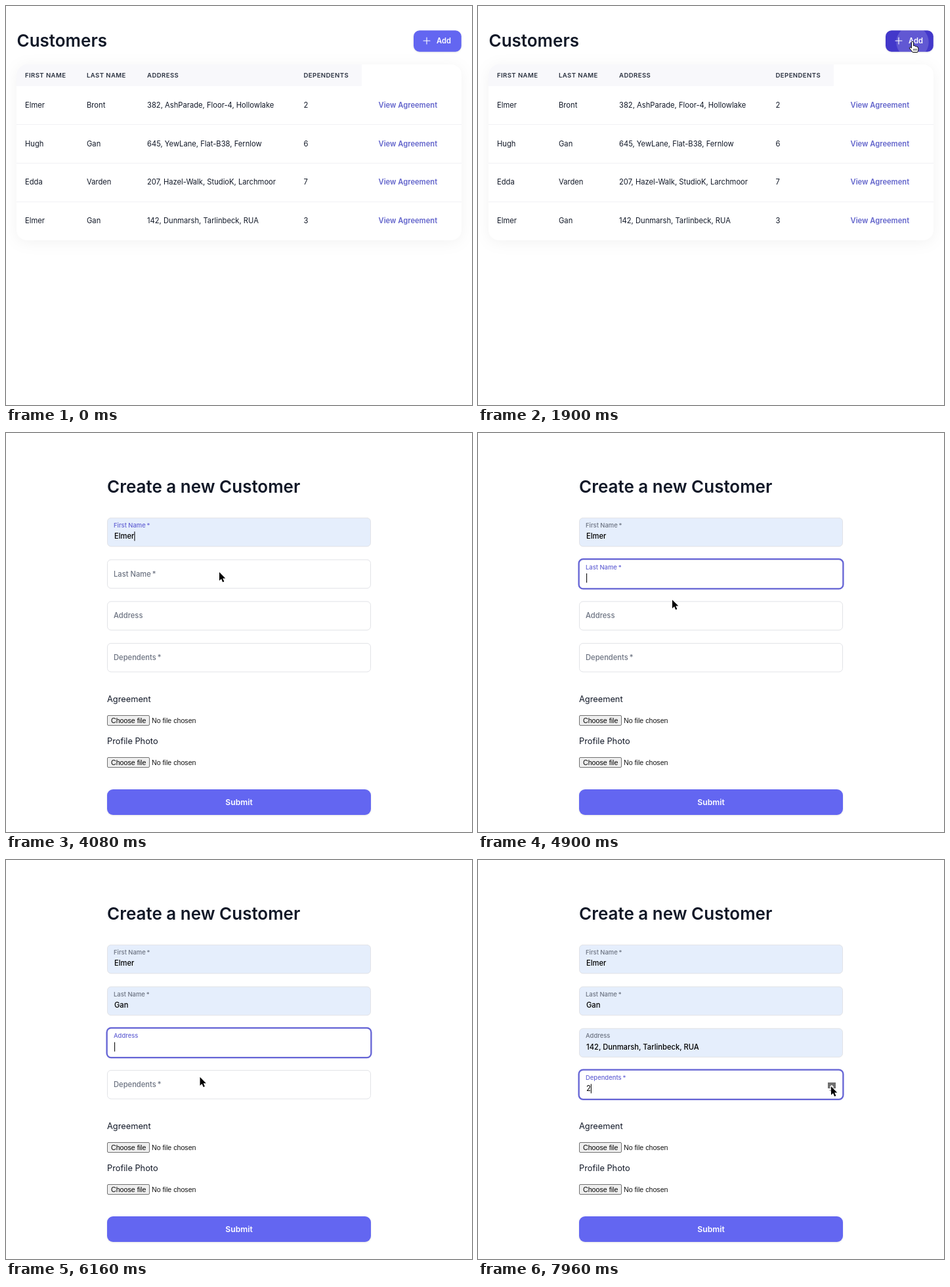
An HTML page that plays this animation: 710 by 608 pixels, repeating every 8 s.

```html
<!DOCTYPE html>
<html lang="en">
<head>
<meta charset="utf-8">
<title>Customers</title>
<style>
  html, body { margin: 0; width: 100%; height: 100%; overflow: hidden; background: #fff; }
  svg { display: block; width: 710px; height: 608px; font-family: Inter, sans-serif; }
  .card { filter: drop-shadow(0 3px 11px rgba(0, 0, 0, .05)); }
  .button { filter: drop-shadow(0 1px 1px rgba(0, 0, 0, .1)); }
  .file { font-family: "Liberation Sans", Arial, sans-serif; }
</style>
</head>
<body>
<svg id="stage" viewBox="0 0 710 608"></svg>
<script>
const LOOP = 8000;
const INK = '#111827', GRAY = [107, 114, 128], INDIGO = [99, 98, 212];
const BUTTON = [99, 102, 241], BUTTON_HOVER = [67, 56, 202];
const PAGE_SWITCH = 2060, HOVER_ADD = 1420, PRESS_ADD = 1850;

const stage = document.getElementById('stage');

function el(parent, tag, attrs = {}, content) {
  const node = document.createElementNS('http://www.w3.org/2000/svg', tag);
  set(node, attrs);
  if (content) node.textContent = content;
  parent.appendChild(node);
  return node;
}
function set(node, attrs) {
  for (const key in attrs) node.setAttribute(key, attrs[key]);
}
function show(node, on) {
  node.style.display = on ? '' : 'none';
}
function label(parent, x, y, content, size, weight = 400, fill = INK, more = {}) {
  return el(parent, 'text', { x, y, 'font-size': size, 'font-weight': weight, fill, ...more }, content);
}
function box(parent, x, y, width, height, rx, fill, more = {}) {
  return el(parent, 'rect', { x, y, width, height, rx, fill, ...more });
}
const clamp = v => Math.max(0, Math.min(1, v));
const smooth = v => v * v * (3 - 2 * v);
const easeOut = v => 1 - (1 - v) ** 3;
const mix = (a, b, k) => a + (b - a) * k;
const mixColor = (a, b, k) => `rgb(${a.map((c, i) => Math.round(mix(c, b[i], k)))})`;

// Customer list
const list = el(stage, 'g');
label(list, 16.5, 62, 'Customers', 26, 600);
const addBox = box(list, 621, 37.3, 72.8, 32.4, 9, '', { class: 'button' });
box(el(list, 'clipPath', { id: 'addClip' }), 621, 37.3, 72.8, 32.4, 9, '#000');
const ripple = el(el(list, 'g', { 'clip-path': 'url(#addClip)' }), 'circle', { cx: 662, cy: 55, fill: '#fff' });
el(list, 'path', { d: 'M641 48V58M636 53H646', stroke: '#fff', 'stroke-width': 1.1, 'stroke-linecap': 'round' });
label(list, 656, 57, 'Add', 11.2, 600, '#fff');

box(list, 16, 89, 678, 268, 16, '#fff', { class: 'card' });
el(list, 'path', { d: 'M16 122V105a16 16 0 0 1 16-16H542V122Z', fill: '#f8f8fb' });
const columns = [29, 123, 215, 453.5];
['FIRST NAME', 'LAST NAME', 'ADDRESS', 'DEPENDENTS'].forEach((name, i) =>
  label(list, columns[i], 109, name, 9.6, 600, '#2b3240', { 'letter-spacing': .4 }));
const HOME = '142, Dunmarsh, Tarlinbeck, RUA';
[
  ['Elmer', 'Bront', '382, AshParade, Floor-4, Hollowlake', '2'],
  ['Hugh', 'Gan', '645, YewLane, Flat-B38, Fernlow', '6'],
  ['Edda', 'Varden', '207, Hazel-Walk, StudioK, Larchmoor', '7'],
  ['Elmer', 'Gan', HOME, '3']
].forEach((row, r) => {
  const y = 155 + 58.7 * r;
  row.forEach((cell, i) => label(list, columns[i], y, cell, 11.2));
  label(list, 567.5, y, 'View Agreement', 11.2, 600, '#6264cb');
  if (r) box(list, 16, 121 + 59 * r, 678, 1, 0, '#f1f1f4');
});

// Customer form
const form = el(stage, 'g');
label(form, 154, 91, 'Create a new Customer', 26, 600);

const fields = [
  { name: 'First Name', star: true, focus: 2920, blur: 4720, fill: 3900, value: 'Elmer', hover: [2620, 2920] },
  { name: 'Last Name', star: true, focus: 4720, blur: 5745, fill: 5580, value: 'Gan', ring: [4780, 5830] },
  { name: 'Address', focus: 5745, blur: 7640, fill: 6720, value: HOME, ring: [5830, 7690] },
  { name: 'Dependents', star: true, focus: 7640, blur: LOOP, hover: [6740, 7640], ring: [7690, LOOP] }
];
const within = (t, span) => !!span && t >= span[0] && t < span[1];

fields.forEach((f, i) => {
  f.y = 128.9 + 63.7 * i;
  f.box = box(form, 154.5, f.y + .5, 401, 43.5, 5.5, '#fff', { stroke: '#e2e3e7' });
  f.outline = box(form, 153.6, f.y - .4, 402.8, 45.2, 6.5, 'none', { stroke: '#6665d6', 'stroke-width': 2.3 });
  f.title = label(form, 164, 0, f.name, 11.2, 500);
  if (f.star) el(f.title, 'tspan', { dx: 1.8 }, '*');
  f.text = label(form, 165, f.y + 32.2, '', 11.2, i < 3 ? 500 : 400, '#000');
  f.caret = box(form, 165, f.y + 21.3, 1.1, 14.2, 0, '#111');
});

const spinner = el(form, 'g');
const spinBox = box(spinner, 533, 339, 12, 9, 0, '#707070');
const spinUp = el(spinner, 'path', { d: 'M535.5 346.5L539 342.7L542.5 346.5Z' });
el(spinner, 'path', { d: 'M535.5 350.5L539 354.3L542.5 350.5Z', fill: '#3c3c3c' });

[['Agreement', 410], ['Profile Photo', 474]].forEach(([name, y]) => {
  label(form, 154, y, name, 12.8);
  box(form, 154.5, y + 20.5, 64, 15, 1.5, '#efefef', { stroke: '#707070' });
  label(form, 160, y + 32, 'Choose file', 10.67, 400, '#000', { class: 'file' });
  label(form, 222, y + 32, 'No file chosen', 10.67, 400, '#111', { class: 'file' });
});
box(form, 154, 543, 402, 39, 9, '#6366f1', { class: 'button' });
label(form, 355, 567, 'Submit', 12.2, 600, '#fff', { 'text-anchor': 'middle' });

// Pointers
const pointers = { arrow: el(stage, 'g'), hand: el(stage, 'g'), beam: el(stage, 'g') };
el(pointers.arrow, 'path', {
  d: 'M0 0V13L3 10.2L5.2 15.2L7.4 14.2L5.2 9.4H9.3Z',
  stroke: '#fff', 'stroke-width': 1.4, 'paint-order': 'stroke'
});
el(pointers.hand, 'path', {
  d: 'M-1.6 1.2Q-1.6-.3 0-.3T1.6 1.2V6.2L2.6 5.9Q4 5.8 4.2 7L5.4 6.8Q6.6 6.9 6.8 8Q8.7 7.7 8.8 9.4V12Q8.7 14 7.6 16H.2Q-1.5 13.5-4.2 10.5Q-5.2 9-3.9 8.4Q-2.8 8.1-1.6 9.6Z',
  fill: '#fff', stroke: '#000'
});
el(pointers.hand, 'path', { d: 'M1.8 10.5v3.2M3.9 10.5v3.2M6 10.5v3.2', stroke: '#000', 'stroke-width': .8 });
[['#fff', 2.6], ['#000', 1.2]].forEach(([stroke, width]) => el(pointers.beam, 'path', {
  d: 'M-3-7.3Q0-7.3 0-5.5Q0-7.3 3-7.3M0-5.5V5.5M-3 7.3Q0 7.3 0 5.5Q0 7.3 3 7.3M-1.5 1.8h3',
  fill: 'none', stroke, 'stroke-width': width
}));

// Pointer path: time, x, y
const path = [
  [260, -12, 523], [860, 680, 39], [1060, 670, 53], [1160, 667, 62], [1420, 667, 62],
  [1700, 662, 54.5], [1980, 662, 54.5], [2240, 558, 104], [2560, 385, 208], [2840, 353, 158],
  [3040, 350, 158], [3280, 338.5, 158], [3620, 338.5, 158], [3960, 325, 212], [4480, 325, 212],
  [4720, 290, 214], [4900, 296, 254], [5060, 295, 274], [5580, 295, 274], [5770, 280, 283],
  [5840, 280, 283], [6100, 295, 333], [6280, 296, 325], [6500, 296, 325], [6540, 294, 333],
  [6660, 294, 333], [6920, 413, 351], [7200, 540, 351], [7360, 538, 345], [8000, 538, 345]
];
const kinds = [
  [0, 'arrow'], [1420, 'hand'], [PAGE_SWITCH, 'arrow'], [2520, 'beam'], [3740, 'arrow'], [4600, 'beam'],
  [4790, 'arrow'], [5660, 'beam'], [5900, 'arrow'], [6760, 'beam'], [7080, 'arrow']
];

// Monotone cubic through the keys: smooth passes, no drift during holds
function slope(i, axis) {
  if (i < 1 || i > path.length - 2) return 0;
  const rate = j => (path[j + 1][axis] - path[j][axis]) / (path[j + 1][0] - path[j][0]);
  const a = rate(i - 1), b = rate(i);
  return a * b > 0 ? 2 * a * b / (a + b) : 0;
}
function along(t, axis) {
  let i = path.findIndex(key => key[0] > t) - 1;
  if (i < 0) i = 0;
  const a = path[i], b = path[i + 1], span = b[0] - a[0], u = clamp((t - a[0]) / span);
  return mix(a[axis], b[axis], smooth(u))
    + span * u * (1 - u) * ((1 - u) * slope(i, axis) - u * slope(i + 1, axis));
}

function drawField(f, t) {
  const ringed = within(t, f.ring), focused = within(t, [f.focus, f.blur]);
  const filled = t >= f.fill;
  const lift = smooth(clamp((t - f.focus) / 150));
  const value = f.value ? (filled ? f.value : '') : t < 7640 ? '' : t < 7880 ? '1' : '2';

  show(f.outline, ringed);
  f.box.setAttribute('fill', filled ? '#e5eefc' : within(t, f.hover) ? '#f4f4f4' : '#fff');
  set(f.title, {
    y: f.y + mix(26, 15, lift),
    'font-size': mix(11.2, 9.44, lift),
    fill: mixColor(GRAY, INDIGO, focused || ringed ? lift : 0)
  });
  if (f.text.textContent !== value) f.text.textContent = value;

  const since = t - (filled ? Math.max(f.fill, f.focus) : f.focus);
  const lit = focused && since % 1000 < 500;
  show(f.caret, lit);
  if (lit) f.caret.setAttribute('x', 165 + (value ? f.text.getComputedTextLength() : 0));
}

function draw(t) {
  const onForm = t >= PAGE_SWITCH;
  show(list, !onForm);
  show(form, onForm);

  if (onForm) {
    fields.forEach(f => drawField(f, t));
    const over = t >= 7200;
    show(spinner, t >= 6740);
    show(spinBox, over);
    spinUp.setAttribute('fill', over ? '#fff' : '#3c3c3c');
  } else {
    addBox.setAttribute('fill', mixColor(BUTTON, BUTTON_HOVER, smooth(clamp((t - HOVER_ADD) / 150))));
    set(ripple, {
      r: 46 * easeOut(clamp((t - PRESS_ADD) / 225)),
      opacity: .16 * (1 - clamp((t - 1980) / 150))
    });
  }

  const kind = kinds.filter(k => k[0] <= t).pop()[1];
  for (const name in pointers) show(pointers[name], name === kind && t >= 260);
  pointers[kind].setAttribute('transform', `translate(${along(t, 1).toFixed(2)} ${along(t, 2).toFixed(2)})`);
}

const start = performance.now();
function tick() {
  draw((performance.now() - start) % LOOP);
  requestAnimationFrame(tick);
}
tick();
</script>
</body>
</html>
```
